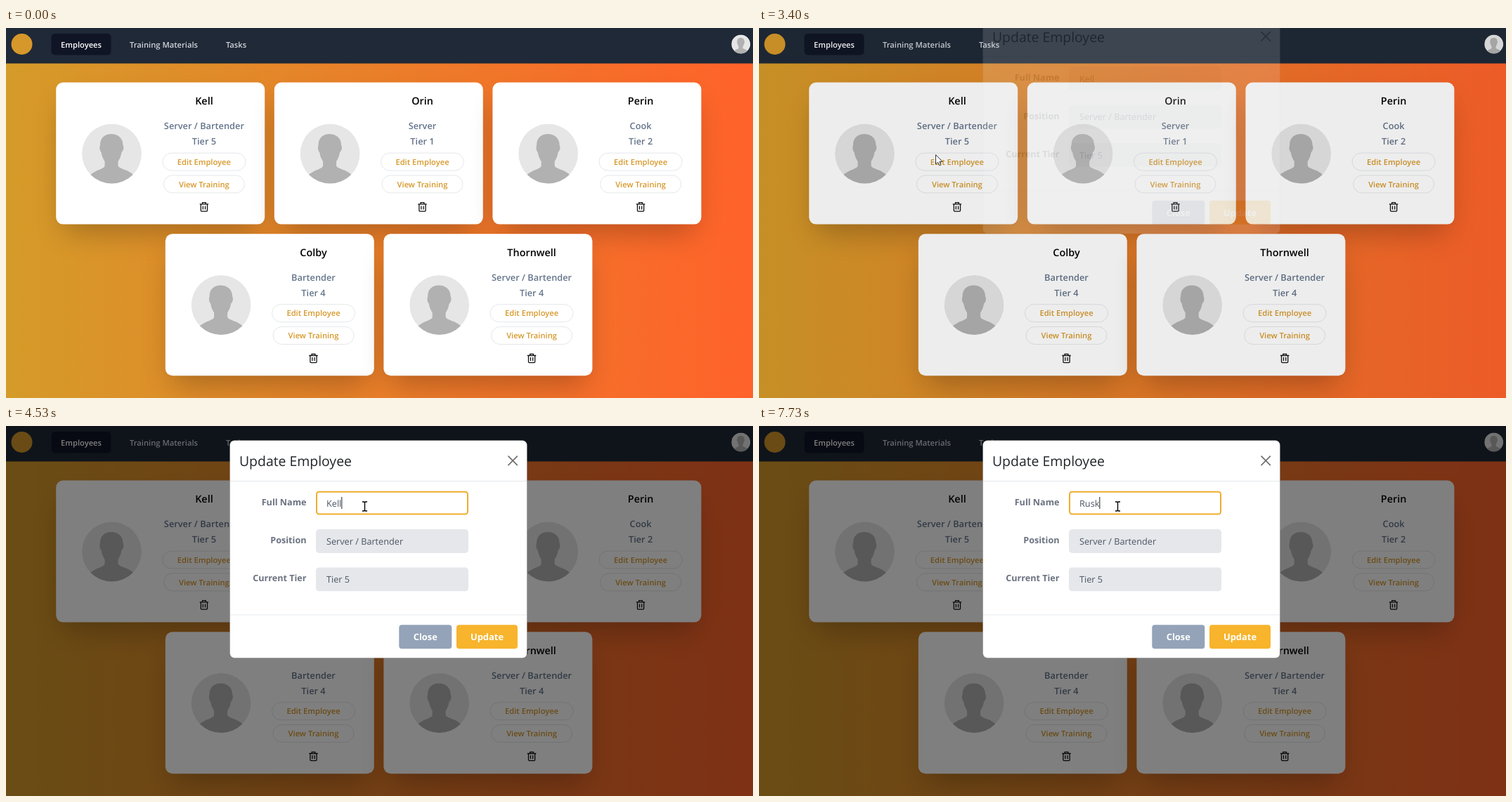
Recreate the animation shown at these times as an HTML page. Size 1063x527 px, loop 8000 ms.

```html
<!DOCTYPE html>
<html lang="en">
<head>
<meta charset="utf-8">
<title>Employee manager</title>
<style>
  html, body { margin: 0; width: 100%; height: 100%; overflow: hidden; }
  svg { display: block; width: 1063px; height: 527px; }
  text { font-family: "Open Sans", "Noto Sans", sans-serif; text-rendering: geometricPrecision; }
</style>
</head>
<body>
<svg id="stage" viewBox="0 0 1063 527">
  <defs>
    <linearGradient id="sunset">
      <stop offset="0" stop-color="#d59b29"/>
      <stop offset="1" stop-color="#ff622a"/>
    </linearGradient>
    <filter id="soft" x="-50%" y="-50%" width="200%" height="200%">
      <feGaussianBlur stdDeviation="21"/>
    </filter>
    <clipPath id="disc"><circle r="42.5"/></clipPath>
    <g id="avatar" clip-path="url(#disc)">
      <circle r="42.5" fill="#e6e6e6"/>
      <path fill="#b1b1b1" d="M-16.5-12C-17-22-10-28-1-28C9-28 16-22 16-12C18-9 16-3 14-2C13 4 11 8 9 11V17
        C10 22 26 23 31 31V45H-31V31C-24 23-10 22-10 17V11C-12 8-14 4-15-2C-17-4-18-9-16.5-12Z"/>
    </g>
    <g id="trash" fill="none" stroke="#111" stroke-width="1.3">
      <path d="M-6.2-4H6.2M-2.4-4V-6.2H2.4V-4M-4.6-4V5.1Q-4.6 6.2-3.5 6.2H3.5Q4.6 6.2 4.6 5.1V-4M-1.6-1.4V3.7M1.6-1.4V3.7"/>
    </g>
  </defs>
  <g id="page"></g>
  <rect id="dim" width="1063" height="527"/>
  <g id="modal"></g>
  <g id="popup"></g>
  <g id="pointer">
    <path id="arrow" fill="#fff" stroke="#222" stroke-width=".9" stroke-linejoin="round"
      d="M.5.5V14L3.6 11.2L5.8 15.8L7.9 14.9L5.8 10.3H10Z"/>
    <path id="hand" fill="#fff" stroke="#222" stroke-width=".9" stroke-linejoin="round"
      d="M-1.5 1.5Q0-.8 1.5 1.5V6.5L8 8Q9.5 8.5 9.3 10.5L8 17H0L-5 11Q-5.5 8.5-3.5 9L-1.5 10.8Z"/>
    <path id="beam" fill="none" stroke="#000" stroke-width="1.4" d="M-3.5-6H-1L0-5.2L1-6H3.5M-3.5 7H-1L0 6.2L1 7H3.5M0-5.2V6.2"/>
  </g>
</svg>
<script>
const LOOP = 8000, STEP = 200 / 3;
const GOLD = '#d6982a';
const $ = id => document.getElementById(id);

const label = (x, y, size, weight, fill, str, anchor = 'middle', extra = '') =>
  `<text x="${x}" y="${y}" font-size="${size}" font-weight="${weight}" fill="${fill}" text-anchor="${anchor}" ${extra}>${str}</text>`;
const box = (x, y, w, h, r, fill, extra = '') =>
  `<rect x="${x}" y="${y}" width="${w}" height="${h}" rx="${r}" fill="${fill}" ${extra}/>`;

function pill(y, w, str, id = '') {
  return `<g ${id && `id="${id}"`}>` +
    box(210.7 - w / 2, y, w, 25, 12.5, '#fff', 'stroke="#e5e7eb"') +
    label(210.7, y + 16.8, 11.2, 600, GOLD, str) + '</g>';
}

function card(x, y, name, role, tier, editId) {
  return `<g transform="translate(${x} ${y})">` +
    box(10, 31, 277, 182, 6, '#000', 'opacity=".25" filter="url(#soft)"') +
    box(0, 0, 297, 202, 10, '#fff') +
    '<use href="#avatar" x="79.3" y="101.3"/>' +
    label(210.7, 31.4, 14.4, 600, '#000', name) +
    label(210.7, 66.6, 12.8, 600, '#64748b', role) +
    label(210.7, 88.6, 12.8, 600, '#64748b', 'Tier ' + tier) +
    pill(100.5, 118, 'Edit Employee', editId) +
    pill(132.3, 115, 'View Training') +
    '<use href="#trash" x="210.7" y="177.3"/></g>';
}

$('page').innerHTML =
  box(0, 0, 1063, 527, 0, 'url(#sunset)') +
  box(0, 0, 1063, 50.5, 0, '#1f2937') +
  `<circle cx="22.5" cy="23" r="15" fill="${GOLD}"/>` +
  box(64.5, 8, 85, 30.5, 5, '#101526') +
  label(107, 28, 11.2, 600, '#fff', 'Employees') +
  label(224.5, 28, 11.2, 600, '#d1d5db', 'Training Materials') +
  label(327.5, 28, 11.2, 600, '#d1d5db', 'Tasks') +
  '<use href="#avatar" transform="translate(1045.7 23) scale(.318)"/>' +
  card(71.2, 77.6, 'Kell', 'Server / Bartender', 5, 'edit') +
  card(381.8, 77.6, 'Orin', 'Server', 1) +
  card(692.4, 77.6, 'Perin', 'Cook', 2) +
  card(226.8, 293.2, 'Colby', 'Bartender', 4) +
  card(537.4, 293.2, 'Thornwell', 'Server / Bartender', 4);

const field = (row, name, value, boxId, textId) => {
  const y = 92.8 + row * 54.3;
  return label(427.5, y + 20, 12.6, 700, '#6b7280', name, 'end') +
    box(442, y + 1, 215, 31.8, 3.5, '#e5e7eb', `id="${boxId}" stroke="#e5e7eb" stroke-width="2"`) +
    label(456, y + 21.7, 12.7, 400, '#4b5563', value, 'start', `id="${textId}"`);
};

$('modal').innerHTML =
  box(318.5, 20.5, 423, 310, 6.8, '#fff', 'stroke="#000" stroke-opacity=".2" stroke-width=".8"') +
  label(332, 57.3, 19.4, 500, '#212529', 'Update Employee', 'start') +
  '<path d="M715 43.2L727.4 55.6M727.4 43.2L715 55.6" stroke="#707070" stroke-width="1.7" stroke-linecap="round"/>' +
  '<path d="M319 78.5H741M319 269H741" stroke="#e6e8eb"/>' +
  field(0, 'Full Name', 'Kell', 'nameBox', 'nameText') +
  field(1, 'Position', 'Server / Bartender', 'posBox', 'posText') +
  field(2, 'Current Tier', 'Tier 5', 'tierBox', 'tierText') +
  box(559.3, 283.2, 75, 34, 4, '#94a3b8') +
  label(596.8, 305.2, 12.9, 700, '#fff', 'Close') +
  box(641, 283.2, 87, 34, 4, '#f7b42c') +
  label(684.5, 305.2, 12.9, 700, '#fff', 'Update') +
  box(476, 101, 1, 17, 0, '#222', 'id="caret"');

const clamp = v => Math.max(0, Math.min(1, v));
const linear = u => u;
const easeOut = u => 1 - (1 - u) ** 2;
const easeInOut = u => u * u * (3 - 2 * u);

// cubic-bezier(0, 0, .58, 1), solved by bisection
function cssEaseOut(x) {
  let lo = 0, hi = 1;
  for (let i = 0; i < 24; i++) {
    const s = (lo + hi) / 2;
    if (1.74 * (1 - s) * s * s + s ** 3 < x) lo = s; else hi = s;
  }
  return 3 * (1 - lo) * lo * lo + lo ** 3;
}

// time, x, y, easing towards this point
const route = [
  [267, 1053, 516], [1067, 461, 195, linear], [1333, 208, 128, linear],
  [1867, 123, 49, easeOut], [2067, 123, 49, linear], [2600, 251, 180, easeInOut],
  [3933, 251, 180, linear], [4400, 510.5, 114, easeInOut]
];
function pointerAt(t) {
  const i = route.findIndex(p => p[0] > t);
  if (i < 1) return route[i < 0 ? route.length - 1 : 0].slice(1, 3);
  const [t0, x0, y0] = route[i - 1], [t1, x1, y1, ease] = route[i];
  const u = ease((t - t0) / (t1 - t0));
  return [x0 + (x1 - x0) * u, y0 + (y1 - y0) * u];
}

const lastBefore = (list, t) => list.filter(e => e[0] <= t + 4).pop();
const typing = [
  [0, 'Kell'], [5467, 'Kel'], [5733, 'Ke'], [5933, 'K'], [6133, ''],
  [6867, 'R'], [7200, 'Ru'], [7333, 'Rus'], [7467, 'Rusk']
];
const caretStates = [[0, 0], [4533, 1], [5067, 0], [5467, 1], [6333, 0], [6667, 1]];
const hints = [
  [0, []], [5600, ['Kell']], [5933, ['Kell', 'Korin', 'Kesper', 'Kimbel']], [6334, []],
  [6867, ['Rusk', 'Rolven', 'Rennick']], [7333, ['Rusk', 'Rusford']], [7734, []]
];

function drawPopup(names) {
  if (!names.length) return '';
  const bottom = 142 + 30.6 * names.length;
  return `<path d="M538 132H544L550 127L556 132H654Q658 132 658 136V${bottom - 4}Q658 ${bottom} 654 ${bottom}
    H538Q534 ${bottom} 534 ${bottom - 4}V136Q534 132 538 132Z" fill="#fff" stroke="#d4d6d9"/>` +
    names.map((n, i) => label(546, 156.3 + i * 30.6, 10.5, 400, '#333', n, 'start')).join('');
}

function render(time) {
  const t = Math.floor((time + 4) / STEP) * STEP;

  const [x, y] = pointerAt(t);
  const overEdit = t < 3390 && x > 223 && x < 341 && y > 178 && y < 203;
  const overName = t > 3933 && x > 441 && x < 658 && y > 92 && y < 127;
  $('pointer').setAttribute('transform', `translate(${x} ${y})`);
  $('pointer').setAttribute('visibility', t < 266 ? 'hidden' : 'visible');
  $('arrow').style.display = overEdit || overName ? 'none' : '';
  $('hand').style.display = overEdit ? '' : 'none';
  $('beam').style.display = overName ? '' : 'none';

  const [editBox, editText] = $('edit').children;
  editBox.setAttribute('fill', overEdit ? GOLD : '#fff');
  editBox.setAttribute('stroke', overEdit ? GOLD : '#e5e7eb');
  editText.setAttribute('fill', overEdit ? '#fff' : GOLD);

  const fade = clamp((t - 3379) / 150);
  $('dim').setAttribute('opacity', fade / 2);
  $('modal').setAttribute('opacity', fade);
  $('modal').setAttribute('transform', `translate(0 ${-42.3 * (1 - cssEaseOut(clamp((t - 3379) / 300)))})`);

  const focused = t > 4530;
  $('nameBox').setAttribute('fill', focused ? '#fff' : '#e5e7eb');
  $('nameBox').setAttribute('stroke', focused ? '#f0ac2c' : '#e5e7eb');
  const value = lastBefore(typing, t)[1];
  $('nameText').textContent = value;
  $('caret').setAttribute('x', 456 + (value ? $('nameText').getComputedTextLength() : 0));
  $('caret').setAttribute('opacity', lastBefore(caretStates, t)[1]);

  $('popup').innerHTML = drawPopup(lastBefore(hints, t)[1]);
  const leaving = t < 6600 ? (t - 6067) / 267 : (t - 7400) / 333;
  $('popup').setAttribute('opacity', 1 - clamp(leaving));
}

function tick() {
  render(performance.now() % LOOP);
  requestAnimationFrame(tick);
}
tick();
</script>
</body>
</html>
```
